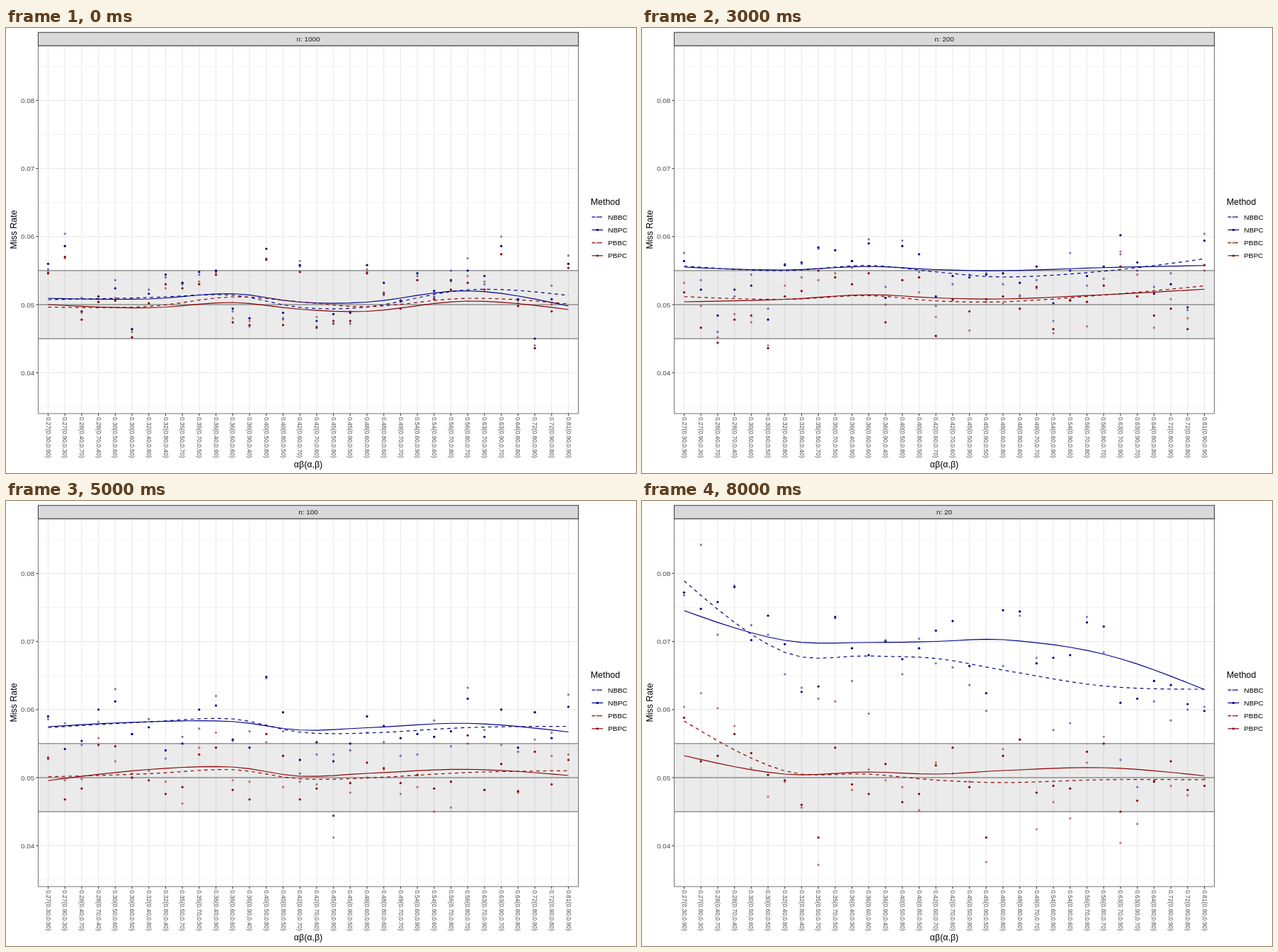
Write an HTML page that moves like this. It is 890 px wide and 629 px high and loops after 9 s.

```html
<!DOCTYPE html>
<html lang="en">
<head>
<meta charset="utf-8">
<title>Miss rate by sample size</title>
<style>
html, body { margin: 0; width: 100%; height: 100%; overflow: hidden; background: #fff; }
svg { display: block; width: 890px; height: 629px; font-family: "Liberation Sans", Arial, sans-serif; font-size: 9.9px; }
</style>
</head>
<body>
<svg id="stage" viewBox="0 0 890 629"></svg>
<script>
const NS = "http://www.w3.org/2000/svg";
const stage = document.getElementById("stage");
const STEP_MS = 1000;
const SIZES = [1000, 500, 250, 200, 150, 100, 75, 50, 20];
const RUNS = 5000;
const PANEL = { x: 45.5, y: 25, w: 763, h: 520 };
const BLUE = "#00008b", RED = "#8b0000", GREY = "#4d4d4d";
const METHODS = {
  NBBC: { color: BLUE, pale: true },
  NBPC: { color: BLUE },
  PBBC: { color: RED, pale: true },
  PBPC: { color: RED }
};
const NAMES = Object.keys(METHODS);

// Every pair of path sizes whose product reaches 0.27, ordered by product
const pairs = [];
for (let a = 3; a < 10; a++)
  for (let b = 3; b < 10; b++)
    if (a * b >= 27) pairs.push([a, b]);
pairs.sort((p, q) => p[0] * p[1] - q[0] * q[1] || p[0] - q[0]);

const colX = i => 59.5 + i * 735 / 31;
const rateY = rate => 391 - (rate - 0.05) * 9620;

// Key heights of the four curves, in the order of NAMES, at these columns
const KNOTS = [0, 6, 11, 15, 19, 25, 31];
const curves = {
  1000: [
    [384, 381, 377.5, 395, 394.5, 370, 378],
    [382, 383, 375.5, 387.5, 387.5, 371.5, 393],
    [394.5, 393.5, 380, 387, 394, 382, 390],
    [391, 395.5, 388, 397.5, 400.5, 386, 398]
  ]
};
curves[250] = [
  [339, 358, 346.5, 343, 353.5, 347.5, 321],
  [344.5, 359, 350.5, 343, 343, 340.5, 332],
  [378, 381, 373, 376, 381.5, 378, 361],
  [387, 386, 376, 373.5, 378.5, 378.5, 364.5]
];
curves[150] = [
  [334, 328, 324.5, 346.5, 350.5, 340, 331.5],
  [331.5, 325, 323.5, 340, 343, 337, 339.5],
  [381.5, 386, 383.5, 395.5, 392.5, 377, 368],
  [387, 381, 378, 389.5, 387.5, 375.5, 374]
];
curves[75] = [
  [306.5, 296.5, 291.5, 307, 305.5, 300.5, 305.5],
  [306.5, 299, 300, 307.5, 298, 291.5, 313.5],
  [398, 385, 376, 390, 390.5, 390.5, 394.5],
  [403.5, 378, 374, 388.5, 382.5, 383, 402]
];
curves[50] = [
  [235, 277, 278, 288, 297, 287.5, 303],
  [232, 268, 273, 277, 284, 276.5, 303],
  [356, 387, 385, 391, 405, 401, 412],
  [374.5, 385, 384.5, 390.5, 395.5, 388.5, 421]
];
curves[20] = [
  [113, 214, 219, 222.5, 239, 261.5, 266],
  [155, 197, 200, 198.5, 196, 216.5, 266.5],
  [311, 381.5, 386, 394.5, 398, 394, 394],
  [360, 386, 383, 386, 381, 377, 388.5]
];
const mean = (p, q) => curves[p].map((ys, m) => ys.map((y, k) => (y + curves[q][m][k]) / 2));
curves[500] = mean(1000, 250);
curves[200] = mean(250, 150);
curves[100] = mean(150, 75);

// Smooth curve through the knots, read at every column
function smooth(ys) {
  const last = KNOTS.length - 1;
  const chord = (a, b) => (ys[b] - ys[a]) / (KNOTS[b] - KNOTS[a]);
  const slope = k => {
    if (k === 0) return (3 * chord(0, 1) - chord(0, 2)) / 2;
    if (k === last) return (3 * chord(last - 1, last) - chord(last - 2, last)) / 2;
    return chord(k - 1, k + 1);
  };
  return pairs.map((_, i) => {
    let k = 0;
    while (k < last - 1 && KNOTS[k + 1] <= i) k++;
    const h = KNOTS[k + 1] - KNOTS[k], t = (i - KNOTS[k]) / h, s = 1 - t;
    return s * s * ((1 + 2 * t) * ys[k] + t * h * slope(k)) +
           t * t * ((1 + 2 * s) * ys[k + 1] - s * h * slope(k + 1));
  });
}

// Seeded, roughly normal noise
function noiseFrom(seed) {
  const rand = () => (seed = seed * 16807 % 2147483647) / 2147483647;
  return () => 2 * (rand() + rand() + rand() - 1.5);
}

// Methods share the binomial error of a column; they part more in small samples
function scatter(n, lines) {
  const noise = noiseFrom(n * 7919);
  const shared = Math.sqrt(RUNS * 0.05 * 0.95);
  const own = 2 + 80 / Math.sqrt(n);
  return pairs.map((_, i) => {
    const column = noise() * shared;
    const family = { [BLUE]: noise() * own / 3, [RED]: noise() * own / 3 };
    return NAMES.map((name, m) => {
      const { color, pale } = METHODS[name];
      const error = column + family[color] + (pale ? noise() * own : 0);
      const misses = Math.round((rateY(0) - lines[m][i]) / 9620 * RUNS + error);
      return Math.max(40, Math.min(522, rateY(misses / RUNS)));
    });
  });
}

function add(parent, tag, attrs, text) {
  const el = document.createElementNS(NS, tag);
  for (const key in attrs) el.setAttribute(key, attrs[key]);
  if (text) el.textContent = text;
  parent.appendChild(el);
  return el;
}
const line = (x1, y1, x2, y2, stroke, width) =>
  add(stage, "line", { x1, y1, x2, y2, stroke, "stroke-width": width });
const label = (x, y, text, attrs) => add(stage, "text", { x, y, ...attrs }, text);

function stroke(parent, d, { color, pale }) {
  add(parent, "path", {
    d, fill: "none", stroke: color, "stroke-width": 1.2, "stroke-linejoin": "round",
    "stroke-dasharray": pale ? "4.8 4.8" : "none"
  });
}
function dot(parent, cx, cy, { color, pale }) {
  add(parent, "circle", { cx, cy, r: 1.65, fill: color, "fill-opacity": pale ? 0.5 : 1 });
}

function drawFrame() {
  const right = PANEL.x + PANEL.w, bottom = PANEL.y + PANEL.h;
  for (let r = 35; r <= 85; r += 10) line(PANEL.x, rateY(r / 1000), right, rateY(r / 1000), "#ebebeb", 0.6);
  for (let r = 4; r <= 8; r++) {
    const y = rateY(r / 100);
    line(PANEL.x, y, right, y, "#ebebeb", 1.2);
    line(42.5, y, PANEL.x, y, "#333", 1.1);
    label(40.3, y + 3.6, "0.0" + r, { "text-anchor": "end", fill: GREY });
  }
  pairs.forEach(([a, b], i) => {
    const x = colX(i);
    line(x, PANEL.y, x, bottom, "#ebebeb", 1.2);
    line(x, bottom, x, bottom + 3, "#333", 1.1);
    label(0, 0, `${(a * b / 100).toFixed(2)}(0.${a}0,0.${b}0)`,
      { transform: `translate(${x - 2.9} 550) rotate(90)`, fill: GREY, "font-size": 8.5 });
  });
  add(stage, "rect", { x: PANEL.x, y: rateY(0.055), width: PANEL.w, height: 96.2, fill: "#000", "fill-opacity": 0.08 });
  for (const r of [0.045, 0.05, 0.055]) line(PANEL.x, rateY(r), right, rateY(r), "#666", 1);
  add(stage, "rect", { x: PANEL.x, y: PANEL.y, width: PANEL.w, height: PANEL.h, fill: "none", stroke: "#737373", "stroke-width": 1 });
  add(stage, "rect", { x: PANEL.x, y: 6.2, width: PANEL.w, height: 18.8, fill: "#d9d9d9", stroke: "#333", "stroke-width": 1 });

  label(427, 620.5, "αβ(α,β)", { "text-anchor": "middle", "font-size": 12.4 });
  label(0, 0, "Miss Rate", { transform: "translate(15.3 285) rotate(-90)", "text-anchor": "middle", "font-size": 12.4 });
  label(826, 250, "Method", { "font-size": 12.4 });
  NAMES.forEach((name, i) => {
    const y = 267.2 + i * 18.2;
    stroke(stage, `M827.6 ${y}H843.4`, METHODS[name]);
    dot(stage, 835.5, y, METHODS[name]);
    label(850.5, y + 3.6, name);
  });
}

function drawSize(n) {
  const group = add(stage, "g", { display: "none" });
  add(group, "text", { x: 427, y: 19, "text-anchor": "middle", fill: "#1a1a1a" }, "n: " + n);
  const lines = curves[n].map(smooth);
  lines.forEach((ys, m) => {
    const points = ys.map((y, i) => `${colX(i).toFixed(2)} ${y.toFixed(2)}`);
    stroke(group, "M" + points.join("L"), METHODS[NAMES[m]]);
  });
  scatter(n, lines).forEach((ys, i) =>
    ys.forEach((y, m) => dot(group, colX(i), y, METHODS[NAMES[m]])));
  return group;
}

drawFrame();
const groups = SIZES.map(drawSize);
const start = performance.now();
let shown = -1;
function tick() {
  const now = Math.floor((performance.now() - start) / STEP_MS) % SIZES.length;
  if (now !== shown) {
    groups.forEach((g, i) => g.setAttribute("display", i === now ? "inline" : "none"));
    shown = now;
  }
  requestAnimationFrame(tick);
}
tick();
</script>
</body>
</html>
```
